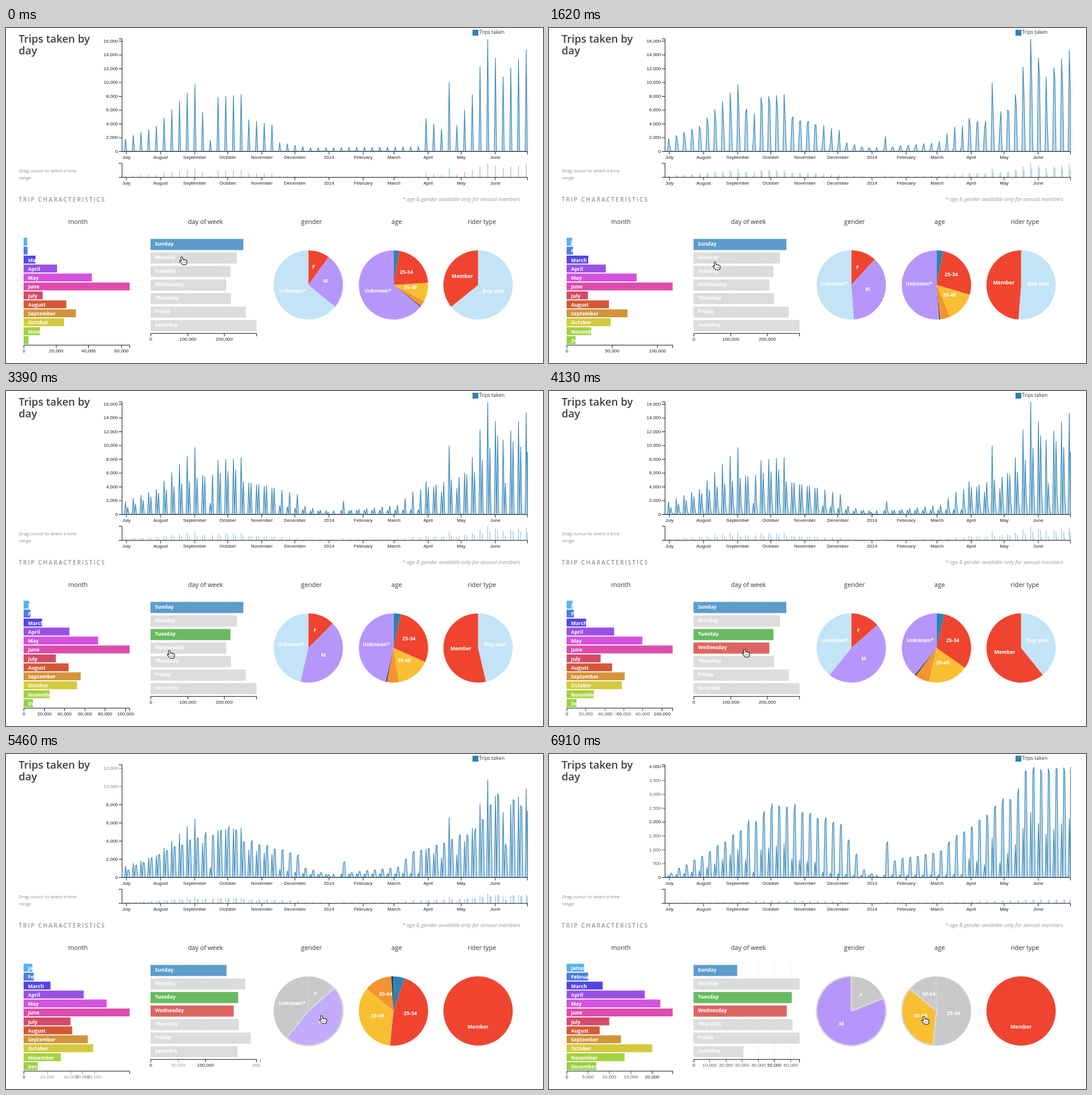
An HTML page with a canvas for the animation above (7.01 s loop, 914 by 571 pixels).

```html
<!DOCTYPE html>
<html lang="en">
<head>
<meta charset="utf-8">
<title>Trips dashboard</title>
<style>
  html, body { margin: 0; width: 100%; height: 100%; overflow: hidden; background: #fff; }
  canvas { display: block; }
</style>
</head>
<body>
<canvas id="stage" width="914" height="571"></canvas>
<script>
const ctx = document.getElementById('stage').getContext('2d');
const LOOP = 7010, TICK = 147.3, WEEKS = 53, FULL = 180.5;
const HUMAN = '"Open Sans", "Noto Sans", sans-serif';
const AXIS = '8px "Liberation Sans", Arial, sans-serif';
const LABEL = '700 8.6px ' + HUMAN;
const RED = '#ef4530', PURPLE = '#b696fb', PALE = '#c3e4f7', BLUE = '#2f83b2';

const lerp = (a, b, p) => a + (b - a) * p;
const mix = (a, b, p) => a.map((v, i) => lerp(v, b[i], p));
const ease = x => x <= 0 ? 0 : x >= 1 ? 1 : x < .5 ? 4 * x ** 3 : 1 - 4 * (1 - x) ** 3;
const noise = n => Math.abs(Math.sin(n * 12.9898) * 43758.5) % 1;

// Straight lines through [x, y] points
function curve(points, x) {
  const i = Math.max(1, points.findIndex(point => point[0] >= x));
  const [x0, y0] = points[i - 1], [x1, y1] = points[i];
  return lerp(y0, y1, (x - x0) / (x1 - x0));
}

// Seasons by week, as heights in pixels: Sundays, midweek, midweek of one age group
const sunday = [[0, 22], [4, 43], [9, 114], [11, 19], [12, 92], [15, 97], [16, 54], [19, 45], [20, 15], [24, 6],
  [38, 8], [39, 56], [41, 38], [42, 117], [43, 44], [45, 97], [47, 191], [49, 127], [52, 173]];
const midweek = [[0, 12], [5, 42], [9, 62], [14, 76], [15, 56], [18, 49], [22, 34], [23, 14], [27, 0], [28, 23],
  [29, 7], [35, 16], [37, 38], [45, 72], [48, 134], [49, 53], [50, 124], [52, 106]];
const aged = [[0, 7], [5, 43], [14, 122], [18, 105], [22, 86], [25, 12], [27, 0], [28, 56], [29, 27], [35, 44],
  [42, 118], [45, 140], [46, 182], [52, 188]];

// Height of the trip line in state s, week w, day d (0 is Sunday)
function height(s, w, d) {
  if (!states[s].on.includes(d)) return 0;
  if (d === 0) return curve(sunday, w) * (s < 4 ? 1 : s === 4 ? .71 : Math.min(.58, .15 + .03 * w));
  const h = s === 5 ? curve(aged, w) : curve(midweek, w) * (s === 4 ? 1.15 : 1);
  return d === 2 ? h : Math.min(189, h * (.94 + .18 * noise(w)));
}

// Selected days, member share in degrees, then pixels per thousand and tick distance of each axis
const common = { y: [11.75, 2000], mini: 1, day: [.6265, 1e5], weekend: 1, weekday: 1 };
const states = [
  { ...common, on: [0], members: 129, month: [2.76, 2e4] },
  { ...common, on: [0, 1], members: 176, month: [1.54, 5e4] },
  { ...common, on: [0, 2], members: 193, month: [1.73, 2e4] },
  { ...common, on: [0, 2, 3], members: 219, month: [1.31, 5e4] },
  { on: [0, 2, 3], members: 360, y: [20.2, 2000], mini: .58, day: [1.32, 5e4], weekend: .59, weekday: 1.22,
    month: [2.87, 2e4], genderMembers: 219, genderOn: 1 },
  { on: [0, 2, 3], members: 360, y: [47.2, 500], mini: .25, day: [2.75, 1e4], weekend: .47, weekday: 1.23,
    month: [7.25, 5e3], genderOn: 1, ageOn: 2 },
];

// Bars and pies follow from the trips and the member share
states.forEach((state, s) => {
  const m = state.members, g = state.genderMembers ?? m;
  const sums = Array(12).fill(0);
  for (let w = 0; w < WEEKS; w++)
    for (let d = s < 4 ? 0 : 1; d < 4; d++)
      sums[new Date(2013, 5, 30 + 7 * w + d).getMonth()] += height(s, w, d);
  state.months = sums.map(v => v / Math.max(...sums) * FULL);
  state.days = [158, 147, 136, 129, 137, 162, 181]
    .map((v, d) => Math.min(FULL, v * (d % 6 ? state.weekday : state.weekend)));
  state.gender = [.14 * g + 18, g, 360];
  state.age = [.04 * m + 4.5, .43 * m + 31, .83 * m + 11, .99 * m, m, 360];
  state.rider = [360 - m, 360];
});

// Clicks: [time, state, duration]
const clicks = [[-2000, 0, 750], [250, 1, 750], [1580, 0, 750], [2620, 2, 750], [3820, 3, 750], [5090, 4, 750], [6480, 5, 460]];
const pointer = [[0, 299, 390], [440, 299, 390], [1320, 283, 396], [2210, 280, 414], [2800, 279, 415], [3390, 278, 442],
  [3860, 278, 442], [4560, 531, 433], [5090, 537, 446], [5900, 537, 446], [6400, 638, 447], [LOOP, 638, 447]];

const dayNames = ['Sunday', 'Monday', 'Tuesday', 'Wednesday', 'Thursday', 'Friday', 'Saturday'];
const dayColors = ['#5d9ccb', '#ffa351', '#68ba60', '#dc6562'];
const monthNames = ['January', 'February', 'March', 'April', 'May', 'June', 'July', 'August', 'September', 'October', 'November', 'December'];
const monthColors = ['#5ab3ea', '#4f7de3', '#5445e2', '#9a50e6', '#d452de', '#dd4dae', '#d64a68', '#d45837', '#d3943a', '#d4c93c', '#a4d23f', '#98d045'];

function text(s, x, y, font, color, align = 'left') {
  ctx.font = font;
  ctx.fillStyle = color;
  ctx.textAlign = align;
  ctx.textBaseline = 'middle';
  ctx.fillText(s, x, y);
}

function lines(color, width, ...paths) {
  ctx.strokeStyle = color;
  ctx.lineWidth = width;
  ctx.beginPath();
  for (const [x, y, ...rest] of paths) {
    ctx.moveTo(x, y);
    for (let i = 0; i < rest.length; i += 2) ctx.lineTo(rest[i], rest[i + 1]);
  }
  ctx.stroke();
}

// Ticks of two [scale, step] axes, crossfaded
function ticks(from, to, p, fade, limit, draw) {
  const has = ([k, step], v) => v % step === 0 && v * k / 1000 <= limit;
  for (let v = 0; v <= 3e5; v += 500) {
    const alpha = (has(from, v) ? 1 - fade : 0) + (has(to, v) ? fade : 0);
    if (alpha < .02) continue;
    ctx.globalAlpha = alpha;
    draw(v.toLocaleString('en-US'), v * lerp(from[0], to[0], p) / 1000);
  }
  ctx.globalAlpha = 1;
}

function eachDay(s0, s1, p, visit) {
  for (let w = 0; w < WEEKS; w++)
    for (let d = -1; d < 5; d++)
      visit(Math.min(887.5, 203.5 + 13.115 * w + 1.874 * d), lerp(height(s0, w, d), height(s1, w, d), p));
}

function timeAxis(y) {
  lines('#222', 1, [197.5, y, 887.5, y, 887.5, y + 5]);
  for (let i = 0; i < 12; i++) {
    const x = 205 + Math.round((new Date(2013, 6 + i) - new Date(2013, 6)) / 864e5) * 1.874;
    lines('#222', 1, [x, y, x, y + 5]);
    text(i === 6 ? '2014' : monthNames[(i + 6) % 12], x, y + 10, AXIS, '#222', 'center');
  }
}

function trips(s0, s1, p, fade) {
  const a = states[s0], b = states[s1];
  ctx.beginPath();
  ctx.moveTo(197.5, 210);
  eachDay(s0, s1, p, (x, h) => ctx.lineTo(x, 210 - h));
  ctx.fillStyle = '#bfdaec';
  ctx.fill();
  ctx.strokeStyle = '#3d89ba';
  ctx.lineWidth = 1.15;
  ctx.lineJoin = 'bevel';
  ctx.stroke();
  timeAxis(210.5);
  lines('#222', 1, [192, 18.5, 197.5, 18.5, 197.5, 210.5]);
  ticks(a.y, b.y, p, fade, 191, (label, h) => {
    const y = 210.5 - h;
    if (y < -4) return;
    if (y > 17) lines('#222', 1, [192, y, 197.5, y]);
    text(label, 190.5, y, AXIS, '#222', 'right');
  });

  const scale = 23.5 / 191 * lerp(a.mini, b.mini, p), bars = [];
  eachDay(s0, s1, p, (x, h) => bars.push([x, 254, x, 254 - h * scale]));
  lines('#74acd3', .9, ...bars);
  timeAxis(254.5);
  lines('#222', 1, [192, 230.5, 197.5, 230.5, 197.5, 254.5, 192, 254.5]);
}

function rows(o) {
  ctx.save();
  ctx.beginPath();
  ctx.rect(o.x - 12, 350, 200, 210);
  ctx.clip();
  ticks(o.from, o.to, o.p, o.fade, 181, (label, dx) => {
    const x = Math.round(o.x + dx) + .5;
    if (o.grid && dx > 0 && dx < 181) lines('#ececec', 1, [x, 355, x, o.floor]);
    lines('#222', 1, [x, o.floor, x, o.floor + 5]);
    text(label, x, o.floor + 10, AXIS, '#222', 'center');
  });
  lines('#222', 1, [o.x + .5, o.floor + 5, o.x + .5, o.floor, o.x + FULL, o.floor, o.x + FULL, o.floor + 5]);
  o.widths.forEach((width, i) => {
    const y = o.top + i * o.pitch;
    ctx.fillStyle = o.color(i);
    ctx.fillRect(o.x, y, width, o.size);
    text(o.names[i], o.x + 7.5, y + o.size / 2 + o.shift, LABEL, '#fff');
  });
  ctx.restore();
}

function pie(cx, ends, names, colors, chosen, hover) {
  const cy = 438, rad = deg => (deg - 90) * Math.PI / 180;
  const start = i => i ? ends[i - 1] : 0;
  const slice = i => {
    ctx.beginPath();
    ctx.moveTo(cx, cy);
    ctx.arc(cx, cy, 59, rad(start(i)), rad(ends[i]));
    ctx.closePath();
  };
  ends.forEach((end, i) => {
    if (end - start(i) < .2) return;
    slice(i);
    ctx.globalAlpha = hover === i ? .8 : 1;
    ctx.fillStyle = chosen === undefined || chosen === i ? colors[i] : '#c9c9c9';
    ctx.fill();
    ctx.globalAlpha = 1;
  });
  if (chosen !== undefined) {
    slice(chosen);
    ctx.strokeStyle = '#d8d8d8';
    ctx.lineWidth = 2.5;
    ctx.stroke();
  }
  ends.forEach((end, i) => {
    if (end - start(i) < 30) return;
    const mid = rad((start(i) + end) / 2);
    text(names[i], cx + 29.5 * Math.cos(mid), cy - 2 + 29.5 * Math.sin(mid), LABEL, '#fff', 'center');
  });
}

function hand(t) {
  const i = Math.max(1, pointer.findIndex(k => k[0] > t));
  const [t0, x0, y0] = pointer[i - 1], [t1, x1, y1] = pointer[i];
  const p = ease((t - t0) / (t1 - t0));
  ctx.save();
  ctx.translate(lerp(x0, x1, p), lerp(y0, y1, p));
  const shape = new Path2D('M-1.5 1Q0-1 1.5 1L2 5Q3.5 4 4.5 5.5Q6 4.5 7 6Q9 5.5 9 8L8.5 11L7.5 13.5H1.5L-2 9.5Q-4.5 7-3 6.5Q-2 6-.5 7.5Z');
  ctx.fillStyle = '#fff';
  ctx.fill(shape);
  ctx.strokeStyle = '#222';
  ctx.lineWidth = 1.1;
  ctx.stroke(shape);
  lines('#444', .7, ...[2.5, 4.5, 6.5].map(x => [x, 8.5, x, 11]));
  ctx.restore();
}

function captions() {
  const title = '600 18px ' + HUMAN, hint = '7.7px ' + HUMAN;
  text('Trips taken by', 21.5, 20, title, '#3b4045');
  text('day', 21.5, 40, title, '#3b4045');
  text('Drag cursor to select a time', 22, 244, hint, '#8a8a8a');
  text('range', 22, 256, hint, '#8a8a8a');
  ctx.letterSpacing = '1.9px';
  text('TRIP CHARACTERISTICS', 21.5, 293, '600 10px ' + HUMAN, '#92969b');
  ctx.letterSpacing = '0px';
  text('* age & gender available only for annual members', 875, 293, 'italic 9px ' + HUMAN, '#999', 'right');
  [['month', 122.5], ['day of week', 339.5], ['gender', 520], ['age', 665], ['rider type', 810]]
    .forEach(([s, x]) => text(s, x, 331, '10.7px ' + HUMAN, '#333', 'center'));
  ctx.fillStyle = BLUE;
  ctx.fillRect(794, 3, 10, 10);
  text('Trips taken', 805, 8, '8.5px ' + HUMAN, '#333');
}

function draw(t) {
  const n = clicks.findLastIndex(c => c[0] <= t);
  const [begin, s1, span] = clicks[n], s0 = clicks[Math.max(0, n - 1)][1];
  const a = states[s0], b = states[s1];
  const p = ease((t - begin) / span), fade = ease((t - begin) / 750), turn = ease((t - begin) / 350);

  ctx.fillStyle = '#fff';
  ctx.fillRect(0, 0, 914, 571);
  captions();
  trips(s0, s1, p, fade);
  rows({ x: 30, top: 357.5, pitch: 15.25, size: 13.5, shift: 1.5, floor: 540.5, names: monthNames, p, fade,
    widths: mix(a.months, b.months, p), color: i => monthColors[i], from: a.month, to: b.month });
  rows({ x: 246, top: 359.5, pitch: 23.05, size: 19, shift: -.5, floor: 520.5, names: dayNames, p, fade, grid: true,
    widths: mix(a.days, b.days, p), color: i => b.on.includes(i) ? dayColors[i] : '#dcdcdc', from: a.day, to: b.day });
  pie(514.5, mix(a.gender, b.gender, turn), ['F', 'M', 'Unknown*'], [RED, PURPLE, PALE], b.genderOn,
    t > 4450 && t < 6100 ? 1 : -1);
  pie(659.5, mix(a.age, b.age, turn), ['18-24', '25-34', '35-49', '50-64', '65+', 'Unknown*'],
    [BLUE, RED, '#f9bf33', '#f49430', '#1d3f66', PURPLE], b.ageOn);
  pie(803.5, mix(a.rider, b.rider, turn), ['Day user', 'Member'], [PALE, RED]);
  hand(t);
}

const zero = performance.now();
function frame() {
  const t = (performance.now() - zero) % LOOP;
  draw(Math.floor((t + 14) / TICK) * TICK); // the picture advances in even steps
  requestAnimationFrame(frame);
}
frame();
</script>
</body>
</html>
```
